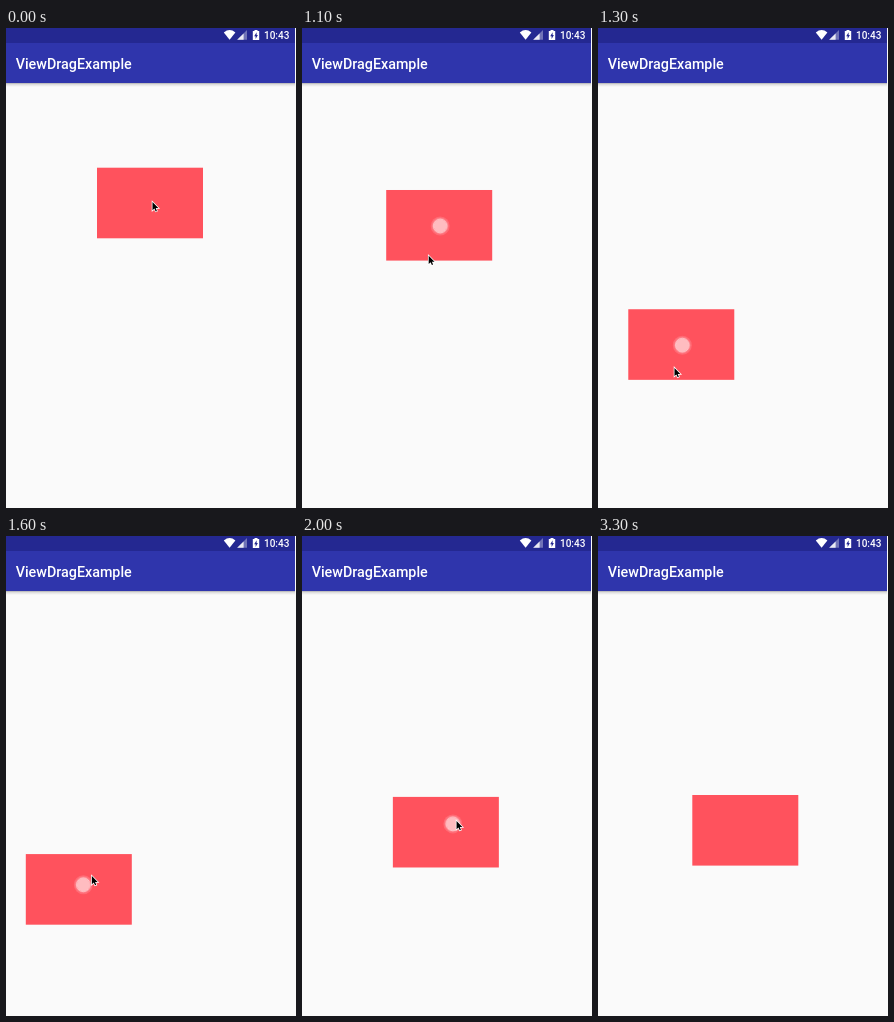
These frames come from a looping animation (290 px wide and 480 px high, 3.4 s). An HTML page:

```html
<!DOCTYPE html>
<html lang="en">
<head>
<meta charset="utf-8">
<title>ViewDragExample</title>
<style>
  html, body { margin: 0; width: 100%; height: 100%; overflow: hidden; background: #fafafa; }
  svg { display: block; width: 290px; height: 480px; }
  text { font-family: Roboto, "Noto Sans", sans-serif; font-weight: 500; fill: #fff; }
</style>
</head>
<body>
<svg viewBox="0 0 290 480">
  <defs>
    <linearGradient id="shadow" x2="0" y2="1">
      <stop offset="0" stop-color="#000" stop-opacity=".3"/>
      <stop offset=".4" stop-color="#000" stop-opacity=".1"/>
      <stop offset="1" stop-color="#000" stop-opacity="0"/>
    </linearGradient>
  </defs>
  <rect width="290" height="480" fill="#fafafa"/>
  <rect y="55" width="289" height="4" fill="url(#shadow)"/>
  <rect width="289" height="55" fill="#2f35ac"/>
  <rect width="289" height="15" fill="#242891"/>
  <text x="9.7" y="40.7" font-size="14.3">ViewDragExample</text>

  <g fill="#fff">
    <path d="M217.8 4.4Q223.6-.2 229.4 4.4L223.6 11.8z"/>
    <path d="M241 2v9.8h-9.8z" opacity=".35"/>
    <path d="M237.6 5.4v6.4h-6.4z" opacity=".85"/>
    <path d="M248.5 2h3v1.1h1.7v8.9h-6.4V3.1h1.7z"/>
    <path d="M250.6 4.2l-2.4 4h1.4v2.8l2.3-4h-1.3z" fill="#242891"/>
  </g>
  <text x="258" y="10.7" font-size="10">10:43</text>

  <rect id="box" width="106" height="70.6" fill="#ff525d"/>
  <g id="touch" fill="#fff">
    <circle r="9.5" opacity=".15"/>
    <circle r="8.2" opacity=".15"/>
    <circle r="6.5" opacity=".47"/>
    <circle r="6.9" fill="none" stroke="#fff" opacity=".45"/>
  </g>
  <path id="cursor" d="M1 1V9.2L2.9 7.5 4.2 10.3 5.4 9.8 4.2 7H6.8z"
        stroke="#fff" stroke-width="1.5" paint-order="stroke"/>
</svg>
<script>
  const LOOP = 3400, STEP = 100;
  const PRESS = 300, RELEASE = 2600, CURSOR_GONE = 2700;
  const CURSOR_LEAD = 68;
  const byId = id => document.getElementById(id);
  const box = byId("box"), touch = byId("touch"), cursor = byId("cursor");

  // Smooth 0 to 1 transition centred on mid
  const glide = (t, mid, spread) => 1 / (1 + Math.exp((mid - t) / spread));

  // One sweep down to the left, then one back up to the right
  const boxAt = t => [
    91 - 74.7 * glide(t, 1222, 53) + 78 * glide(t, 1800, 65),
    139.7 + 181.8 * glide(t, 1222, 62) - 62.5 * glide(t, 1785, 62)
  ];

  // The finger's hold on the box drifts when the drag turns back
  function touchAt(t) {
    const [x, y] = boxAt(t), drift = glide(t, 1580, 55);
    return [x + 54 + 6 * drift, y + 36 - 9 * drift];
  }

  function cursorAt(t) {
    const [x, y] = touchAt(t + CURSOR_LEAD);
    return [x + 0.5, y - 2.6];
  }

  function place(node, [x, y], visible = true) {
    node.setAttribute("transform", `translate(${x} ${y})`);
    node.setAttribute("visibility", visible ? "visible" : "hidden");
  }

  function draw(now) {
    const t = Math.floor((now % LOOP) / STEP) * STEP;
    place(box, boxAt(t));
    place(touch, touchAt(t), t >= PRESS && t < RELEASE);
    place(cursor, cursorAt(t), t < CURSOR_GONE);
  }

  const start = performance.now();
  function tick() {
    draw(performance.now() - start);
    requestAnimationFrame(tick);
  }
  tick();
</script>
</body>
</html>
```
